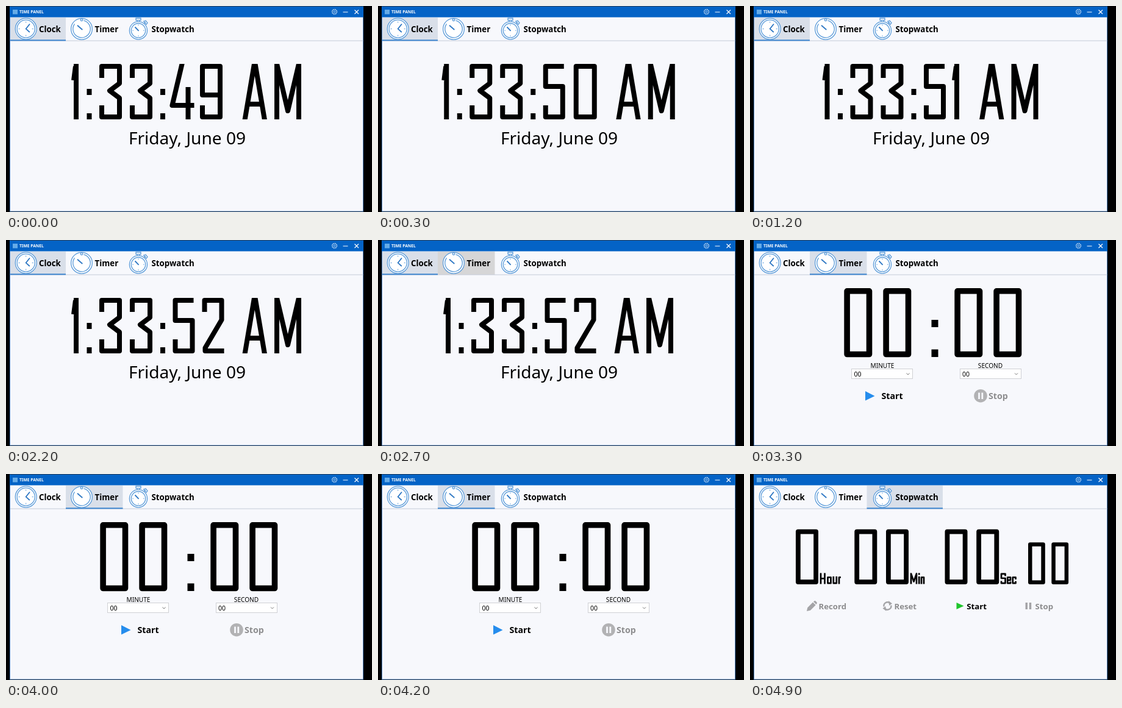
Animation, 600 px wide and 338 px high, one loop 5000 ms. Source, as an HTML page:

```html
<!DOCTYPE html>
<html lang="en">
<head>
<meta charset="utf-8">
<title>Clock, timer and stopwatch</title>
<style>
  html, body { margin: 0; width: 100%; height: 100%; overflow: hidden; background: #000; }
  svg { display: block; width: 100%; height: 100%; font-family: "Noto Sans", sans-serif; }
  .line { fill: none; stroke: #000; stroke-linejoin: round; }
  .icon { fill: none; stroke: #5b9bd9; stroke-width: 1.3; }
  .face { fill: #fff; }
  .hand { stroke: #2f78c4; stroke-width: 1.8; }
  .tab { font-weight: 700; font-size: 13.3px; }
  .timer { font-weight: 700; font-size: 14.2px; }
  .watch { font-weight: 700; font-size: 13.2px; }
  .off { fill: #8d8d8f; }
</style>
</head>
<body>
<svg viewBox="0 0 600 338">
  <clipPath id="capHeight"><rect y="95" width="600" height="91"/></clipPath>
  <rect x="6.5" y="1" width="579" height="336" fill="#f7f8fc" stroke="#4d7cb5"/>
  <rect x="6" y="1" width="580" height="17.5" fill="#0463c6"/>
  <rect x="11" y="6" width="8" height="7.5" fill="#65abe8"/>
  <text x="22" y="12.4" font-size="6.7" font-weight="700" fill="#fff">TIME PANEL</text>
  <g fill="none" stroke="#b9d5f2" stroke-width=".9">
    <circle cx="538.5" cy="9.5" r="3.7"/>
    <circle cx="538.5" cy="9.5" r="4.4" stroke-dasharray="1.7 1.756"/>
    <circle cx="538.5" cy="9.5" r="1.5"/>
    <path d="M552.5 10H560.5M571.5 6.5L578 13M578 6.5L571.5 13" stroke="#fff" stroke-width="1.2"/>
  </g>

  <rect id="hover" y="19" height="38" fill="#d6d6d7"/>
  <rect id="selected" y="19" height="38" fill="#d9dfe9"/>
  <path d="M7 57H585.5" stroke="#c4cad8"/>
  <rect id="underline" y="55.3" height="2" fill="#3f86cf"/>

  <g class="icon">
    <circle class="face" cx="32.7" cy="37.5" r="17.4"/>
    <circle cx="32.7" cy="37.5" r="14.6"/>
    <path class="hand" d="M39 29.5L32.7 37.5L38.8 43"/>
    <path d="M32.7 25.5v2M32.7 47.5v2M20.7 37.5h2M42.7 37.5h2" stroke-width="1"/>
  </g>
  <g class="icon">
    <circle class="face" cx="124" cy="37.7" r="17.4"/>
    <path d="M127.5 23.9A14.2 14.2 0 1 1 112.5 29.4"/>
    <circle cx="124" cy="22.7" r="1.8" fill="#fff"/>
    <path class="hand" d="M117 31.7L125.3 39" stroke-width="2.6"/>
  </g>
  <g class="icon">
    <circle class="face" cx="217" cy="40.2" r="14.6"/>
    <circle cx="217" cy="40.2" r="11.7"/>
    <path class="face" d="M213 20H221V23.3H213ZM215 23.3V26M219 23.3V26M226.5 28.7L228.7 26.2M225.8 25.2L229 24L232 27.8L230 30.2Z"/>
    <path class="hand" d="M211.5 34.5L217.6 40.8"/>
    <path d="M217 30.5v1.6M217 48.3v1.6M207.3 40.2h1.6M225.1 40.2h1.6" stroke-width="1"/>
  </g>
  <g class="tab">
    <text x="54" y="43.3">Clock</text>
    <text x="145.5" y="43.3">Timer</text>
    <text x="238.5" y="43.3">Stopwatch</text>
  </g>

  <g class="page">
    <g clip-path="url(#capHeight)"><g id="time" class="line" stroke-width="8"></g></g>
    <text x="297" y="227.3" font-size="28.1" text-anchor="middle">Friday, June 09</text>
  </g>

  <g class="page">
    <g id="timerDigits" class="line" stroke-width="9.6"></g>
    <path d="M297.5 131H308.5V143H297.5ZM297.5 179.5H308.5V192H297.5Z"/>
    <g font-size="10.1" text-anchor="middle">
      <text x="217" y="209.6">MINUTE</text>
      <text x="394" y="209.6">SECOND</text>
    </g>
    <g fill="#fff" stroke="#cfd0d4">
      <rect x="166.5" y="211.5" width="100" height="16"/>
      <rect x="344.5" y="211.5" width="100" height="16"/>
    </g>
    <path d="M256.5 218.5L259 221L261.5 218.5M434 218.5L436.5 221L439 218.5" fill="none" stroke="#777"/>
    <g font-size="10.5">
      <text x="170.5" y="223.5">00</text>
      <text x="348" y="223.5">00</text>
    </g>
    <path d="M189 248L204.5 256L189 263.5Z" fill="#268ded"/>
    <circle cx="378" cy="255.7" r="10.8" fill="#b2b2b4"/>
    <path d="M375.5 250.5V261M380.8 250.5V261" stroke="#f7f8fc" stroke-width="2.8"/>
    <g class="timer">
      <text x="215.5" y="261">Start</text>
      <text x="391" y="261" class="off">Stop</text>
    </g>
  </g>

  <g class="page">
    <g id="watchDigits" class="line" stroke-width="7.8"></g>
    <g id="watchSmall" class="line" stroke-width="6.5"></g>
    <g class="line" stroke-width="2.7">
      <path transform="translate(114.5 162.5)" d="M1.5 0V18M8 0V18M1.5 9H8M13 7H18V16.7H13ZM22.3 5.5V16.7H27.3V5.5M31.5 18V7H34.5"/>
      <path transform="translate(262.5 162.5)" d="M1.5 18V1L6 14L10.5 1V18M14.7 5.5V18M14.7 0V3M18.5 18V7H22.5V18"/>
      <path transform="translate(410 162.5)" d="M8.5 5V1.3H2V8.5H8.5V16.7H2V13M17 14V16.7H12.2V7H17V11.7H12.2M25.5 10.5V7H20.8V16.7H25.5V13.3"/>
    </g>
    <g fill="#a4a4a7">
      <path d="M93 225L94.3 219.2L103 210.5L107.7 215L99 223.7ZM104 209.5L105.5 208.2Q106.5 207.6 107.3 208.3L109.6 210.6Q110.3 211.5 109.6 212.5L108.5 214Z"/>
      <path d="M451.5 211H455V222H451.5ZM457.7 211H461.2V222H457.7Z"/>
      <path d="M227 208L233 212.5L228.3 216ZM223.5 225L217.5 220.5L222.2 217Z"/>
    </g>
    <path d="M219.5 217.5A6 6 0 0 1 229 211.6M231.3 215.5A6 6 0 0 1 221.5 221.2" fill="none" stroke="#a4a4a7" stroke-width="2.3"/>
    <path d="M338.5 211L350.5 216.5L338.5 222Z" fill="#1fc52c"/>
    <g class="watch">
      <text x="112.5" y="222" class="off">Record</text>
      <text x="236.5" y="222" class="off">Reset</text>
      <text x="355.3" y="222">Start</text>
      <text x="467.5" y="222" class="off">Stop</text>
    </g>
  </g>
</svg>
<script>
  const LOOP = 5000;
  const byId = id => document.getElementById(id);
  const pages = document.querySelectorAll(".page");
  const tabs = [[7, 91], [98, 93.5], [191.5, 124.5]];

  // Condensed display letters: [advance, centre line]; slanted ends are clipped flat
  const glyphs = {
    "0": [50, "M10 4H40V87H10Z"],
    "1": [21.5, "M10 0V91M9 4L6 27"],
    "2": [44.5, "M8 23V4H36V36L9 82V87H40"],
    "3": [50, "M10 23V4H39V32L23 44L39 56V87H10V68"],
    "4": [44.5, "M22 -4L5 68H41M31 38V91"],
    "5": [50, "M40 4H10V37H38V87H10V68"],
    "9": [50, "M39 51H10V4H39V87H10V68"],
    ":": [20.5, "M10 41V51M10 81V91"],
    " ": [26, ""],
    "A": [46, "M3 95L19 0H20.5L36.5 95M7 66H32"],
    "M": [50, "M10 91V0L28 77L46 0V91"]
  };

  function displayText(text, centre, top) {
    const width = [...text].reduce((sum, c) => sum + glyphs[c][0], 0);
    let x = centre - width / 2;
    return [...text].map(c => {
      const path = `<path transform="translate(${x} ${top})" d="${glyphs[c][1]}"/>`;
      x += glyphs[c][0];
      return path;
    }).join("");
  }

  // Zeros given by their outer box; the stroke lies inside it.
  function zeros(id, lefts, top, width, height) {
    const group = byId(id), s = +group.getAttribute("stroke-width");
    group.innerHTML = lefts.map(x =>
      `<path d="M${x + s / 2} ${top + s / 2}h${width - s}v${height - s}h${s - width}z"/>`).join("");
  }
  zeros("timerDigits", [154.3, 218.3, 335.3, 399.3], 79, 46, 113.3);
  zeros("watchDigits", [75, 171.3, 223, 319.5, 371.2], 90.7, 37, 90.3);
  zeros("watchSmall", [456, 494.3], 112.3, 27.8, 68.7);

  function placeOnTab(id, index) {
    const rect = byId(id), [x, width] = tabs[index] || [0, 0];
    rect.setAttribute("x", x);
    rect.setAttribute("width", width);
  }

  let shownTime = "";
  function draw(t) {
    const page = t < 3100 ? 0 : t < 4400 ? 1 : 2;
    const hovered = t >= 2500 && t < 3100 ? 1 : t >= 4300 && t < 4400 ? 2 : -1;
    pages.forEach((p, i) => p.style.display = i === page ? "" : "none");
    placeOnTab("selected", page);
    placeOnTab("underline", page);
    placeOnTab("hover", hovered);

    const second = Math.min(52, 49 + Math.floor((t + 800) / 1000));
    const time = `1:33:${second} AM`;
    if (time !== shownTime) {
      byId("time").innerHTML = displayText(time, 294.5, 95);
      shownTime = time;
    }
  }

  const start = performance.now();
  function frame() {
    draw((performance.now() - start) % LOOP);
    requestAnimationFrame(frame);
  }
  frame();
</script>
</body>
</html>
```
